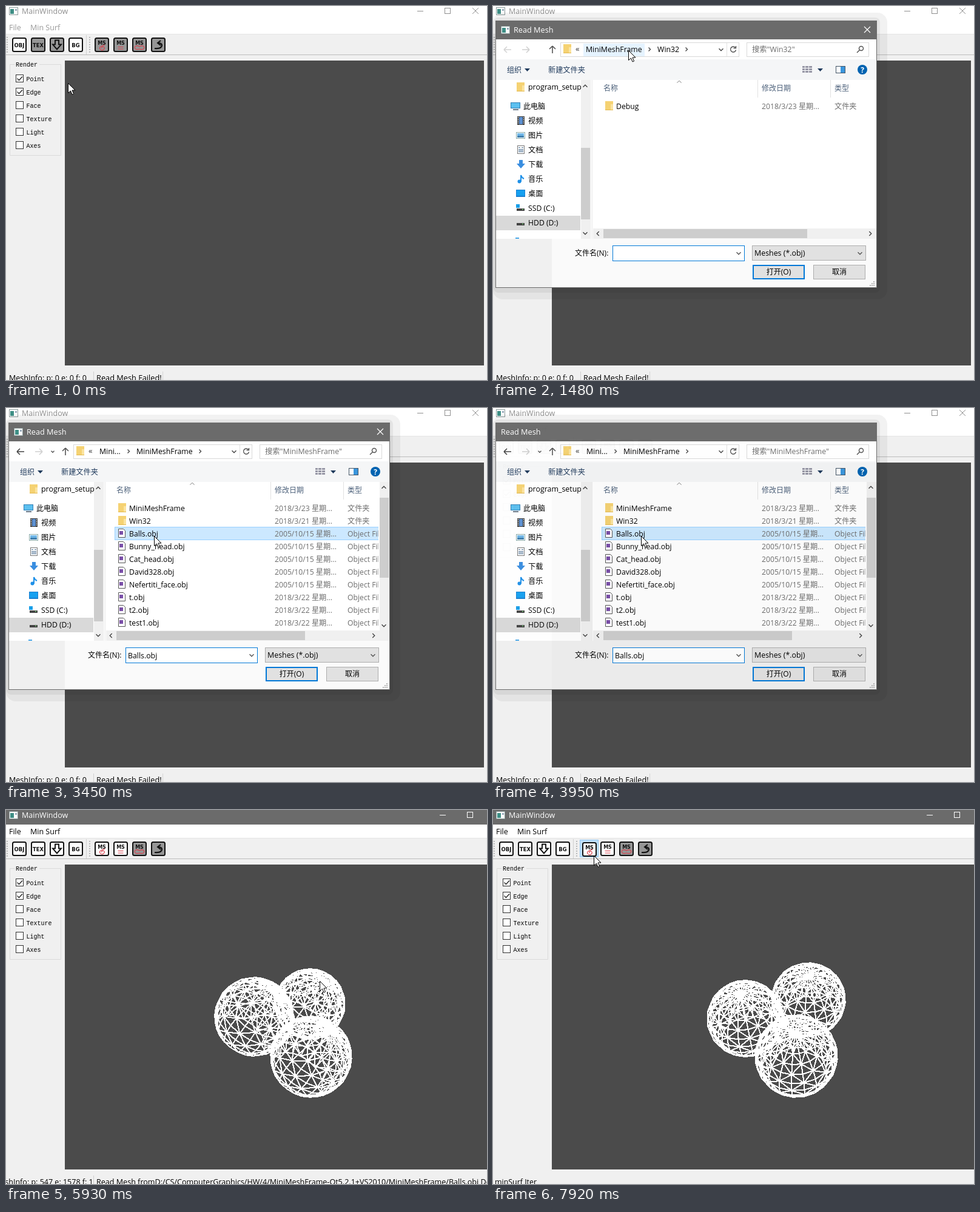
An HTML page that plays this animation: 793x617 px, repeating every 8000 ms.

```html
<!DOCTYPE html>
<html lang="zh">
<head>
<meta charset="utf-8">
<title>Mesh viewer</title>
<style>
html, body { margin: 0; width: 100%; height: 100%; overflow: hidden; background: #f0f0f0; }
svg { display: block; width: 793px; height: 617px; }
text { font-family: "Open Sans", "Noto Sans CJK SC", "Noto Sans CJK", "Noto Sans", sans-serif; white-space: pre; }
.mono { font-family: "Liberation Mono", monospace; }
.bold { font-family: "DejaVu Sans", sans-serif; font-weight: bold; }
</style>
</head>
<body>
<svg id="stage" viewBox="0 0 793 617"></svg>
<script>
const LOOP = 8000;
const BLUE = '#0078d7', GREY = '#6d6d6d';

// ---- drawing helpers ----
const rect = (x, y, w, h, fill, extra = '') =>
  `<rect x="${x}" y="${y}" width="${w}" height="${h}" fill="${fill}" ${extra}/>`;
const frame = (x, y, w, h, stroke, fill = 'none', sw = 1) =>
  rect(x + sw / 2, y + sw / 2, w - sw, h - sw, fill, `stroke="${stroke}" stroke-width="${sw}"`);
const line = (d, stroke, sw = 1, extra = '') =>
  `<path d="${d}" fill="none" stroke="${stroke}" stroke-width="${sw}" ${extra}/>`;
const shape = (d, fill, extra = '') => `<path d="${d}" fill="${fill}" ${extra}/>`;
const text = (x, y, s, fill = '#000', size = 12.3, extra = '') =>
  `<text x="${x}" y="${y}" fill="${fill}" font-size="${size}" ${extra}>${s}</text>`;
const at = (x, y, body) => `<g transform="translate(${x} ${y})">${body}</g>`;
const chevron = (x, y, dir, color = '#444', r = 3.5, sw = 1.4) =>
  line(`M${-r} ${-r / 2}L0 ${r / 2}L${r} ${-r / 2}`, color, sw,
    `transform="translate(${x} ${y}) rotate(${{ down: 0, left: 90, up: 180, right: 270 }[dir]})"`);

const windowIcon = (x, y) => at(x, y,
  frame(0, 0, 15, 13, '#8a9a9a', '#fff') + rect(2, 3, 6, 8, '#3f8f86') + rect(10, 3, 3, 3, '#9ab'));
const folder = (x, y) => at(x, y,
  rect(0, 0, 13, 15, '#f5d273') + rect(9, 5, 4, 10, '#fbe4a0') + rect(0, 14, 13, 1, '#e3b94f'));
const objFile = (x, y) => at(x, y,
  shape('M1.5.5h8l3 3v11h-11z', '#fff', 'stroke="#555"') + rect(3, 4, 6, 6, '#7a4fa8'));
const cursor = ([x, y]) => at(x, y,
  shape('M.5.5v16l4-3.5 2.6 6 2.5-1.1-2.6-5.9h5z', '#fff', 'stroke="#000"'));

// ---- main window ----
const label = (s, y, size) => text(12, y, s, '#111', size, 'class="bold" text-anchor="middle"');
const ms = red => label('MS', 11.5, 8) + line(red, '#d8404c', 1.2);
const glyphs = {
  obj: label('OBJ', 15.5, 8.6),
  tex: label('TEX', 15.5, 8.4),
  save: line('M9 4.5h6v7h4l-7 8-7-8h4z', '#111', 1.9),
  bg: label('BG', 15.5, 8.4),
  ms1: ms('M17 12l-5 2q-5 2-3 5t6 1q3-4-1-5-3 0-2 3'),
  ms2: ms('M7.5 15.5h9M7.500 19h9'),
  ms3: ms('M12 15q-6-3-8 1 0 5 8 3 8 2 8-3-2-4-8-1z'),
  undo: line('M6 18Q17 19 18 13Q18 9 12 9M16 5l-5 4 5 4', '#111', 2.1)
};
const buttons = [['obj', 10], ['tex', 41], ['save', 72], ['bg', 103],
  ['ms1', 146], ['ms2', 177], ['ms3', 208], ['undo', 239]];

function toolbar(loaded, hot, pressed) {
  const grip = x => line(`M${x} 51v28`, '#aaa', 2, 'stroke-dasharray="1.5 2.5"');
  let s = rect(0, 47, 793, 34, '#f0f0f0') + rect(0, 46, 793, 1, '#e4e4e4') + rect(0, 80, 793, 1, '#bcbcbc') +
    grip(2) + grip(138) + rect(132, 48, 1, 32, '#cfcfcf');
  buttons.forEach(([id, x], i) => {
    const on = loaded ? i < 6 : i === 0 || i === 3;
    const d = id === hot && pressed ? 1 : 0;
    if (id === hot) s += frame(x - 3, 49, 31, 29, '#90c8f6', pressed ? '#bfdff8' : '#d5e9f9');
    s += at(x + d, 52 + d,
      rect(1, 1, 22, 22, on ? '#fff' : '#969696', 'rx="2.5" stroke="#111" stroke-width="2"') + glyphs[id]);
  });
  return s;
}

function renderBox() {
  let s = line('M14 96.5H6.5V246.5H90.5V96.5H55', '#dadada') + text(16, 100, 'Render', '#000', 10, 'class="mono"');
  ['Point', 'Edge', 'Face', 'Texture', 'Light', 'Axes'].forEach((name, i) => {
    const y = 113 + 22 * i;
    s += frame(16, y, 13, 13, '#333', '#fff') + text(33.5, y + 11, name, '#000', 10, 'class="mono"');
    if (i < 2) s += line(`M18.5 ${y + 6.5}l3 3 5.5-6`, '#222', 1.3);
  });
  return s;
}

function statusBar(loaded, tip) {
  if (tip) return text(3, 618, tip, '#000', 12.4);
  const info = loaded
    ? `<svg width="143" height="617">${text(-20, 618, 'MeshInfo: p: 547 e: 1578 f: 1032', '#000', 12.5)}</svg>` +
      text(149, 618, 'Read Mesh fromD:/CS/ComputerGraphics/HW/4/MiniMeshFrame-Qt5.2.1+VS2010/MiniMeshFrame/Balls.obj Done', '#000', 12.57)
    : text(5, 618, 'MeshInfo: p: 0 e: 0 f: 0', '#000', 12.5) + text(149, 618, 'Read Mesh Failed!', '#000', 12.75) +
      rect(258, 603, 1, 14, '#d4d4d4');
  return info + rect(144, 603, 1, 14, '#d0d0d0');
}

function mainWindow({ loaded, hot, pressed, tip }) {
  const ink = loaded ? '#fff' : '#8f8f8f', menu = loaded ? '#000' : '#999', mx = loaded ? 715 : 678;
  return rect(0, 0, 793, 617, '#f0f0f0') + rect(0, 0, 793, 47, '#fff') +
    (loaded ? rect(0, 0, 793, 24, '#6b6b6b') : '') +
    windowIcon(5, 2) + text(26, 13, 'MainWindow', ink, 12.5) +
    line(`M${mx} 8.5h10`, ink) + frame(mx + 45, 3, 10, 10, ink) +
    line(`M${mx + 91} 3l10 10m0-10l-10 10`, ink) +
    text(5, 40, 'File', menu, 12.5) + text(40, 40, 'Min Surf', menu, 12.5) +
    toolbar(loaded, hot, pressed) + renderBox() +
    rect(97, 90, loaded ? 696 : 691, 503, '#4b4b4b') + statusBar(loaded, tip);
}

// ---- mesh: three open balls, each [cx, cy, r, pole dx, pole dy] ----
const poses = [
  { spin: 0, balls: [[461, 290, 66, 0, 6], [401, 392, 66, 7, -5], [521, 392, 66, -8, -5]] },
  { spin: 22, balls: [[478, 305, 62, 12, -20], [406, 365, 66, 18, -26], [496, 411, 67, 13, -25]] },
  { spin: 34, balls: [[486, 316, 58, 20, -33], [392, 345, 66, 27, -38], [495, 414, 67, 25, -37]] },
  { spin: 38, balls: [[501, 320, 58, 24, -38], [409, 341, 65, 31, -44], [503, 407, 67, 32, -42]] },
  { spin: 42, balls: [[520, 313, 61, 0, -39], [416, 344, 63, -8, -42], [500, 406, 68, -2, -37]] }
];
const RINGS = 9, SPOKES = 20, RING_STEP = Math.PI / 12;

// See-through wireframe from the pole down to an open rim.
function ball([cx, cy, r, px, py], spin) {
  const a = px / r, b = py / r, c = Math.sqrt(1 - a * a - b * b), k = 1 / (1 + c);
  const vertex = (i, j) => {
    const th = i * RING_STEP, ph = j * 2 * Math.PI / SPOKES + spin;
    const x = Math.sin(th) * Math.cos(ph), y = Math.sin(th) * Math.sin(ph), z = Math.cos(th);
    return (cx + r * ((1 - a * a * k) * x - a * b * k * y + a * z)).toFixed(1) + ' ' +
      (cy + r * (-a * b * k * x + (1 - b * b * k) * y + b * z)).toFixed(1);
  };
  let d = '';
  for (let i = 0; i < RINGS; i++) {
    for (let j = 0; j < SPOKES; j++) {
      const A = vertex(i, j), B = vertex(i, j + 1), C = vertex(i + 1, j + 1), D = vertex(i + 1, j);
      d += `M${A}L${D}L${C}`;
      if (i) d += (i + j) % 2 ? `L${A}` : `M${B}L${D}`;
    }
  }
  return d;
}
const mesh = ({ spin, balls }) =>
  line(balls.map(q => ball(q, spin * Math.PI / 180)).join(''), '#fff', 2.1,
    'shape-rendering="crispEdges" stroke-linejoin="round"');

// ---- file dialog ----
const files = [
  ['ipch', '2018/3/23'], ['MiniMeshFrame', '2018/3/23'], ['Win32', '2018/3/21'],
  ['Balls.obj', '2005/10/15'], ['Bunny_head.obj', '2005/10/15'], ['Cat_head.obj', '2005/10/15'],
  ['David328.obj', '2005/10/15'], ['Nefertiti_face.obj', '2005/10/15'],
  ['t.obj', '2018/3/22'], ['t2.obj', '2018/3/22'], ['test1.obj', '2018/3/22']
];

const drive = rect(1, 9, 13, 4, '#444') + rect(10, 10, 2, 1, '#8f8');
const tree = [
  ['视频', rect(2, 1, 12, 14, '#333') + rect(5, 2, 6, 12, '#5b8fd0') + line('M3.5 2v12m9-12v12', '#fff', 1, 'stroke-dasharray="2 1"')],
  ['图片', frame(0, 3, 15, 11, '#8aa', '#fff') + rect(2, 5, 11, 4, '#6fb6e8') + rect(2, 9, 11, 3, '#3f7fae')],
  ['文档', frame(2, 1, 12, 14, '#777', '#fff') + line('M4 4.5h3m2 0h3M4 7.5h8M4 9.5h8M4 11.5h8', '#579')],
  ['下载', shape('M5 1h6v6h4l-7 8-7-8h4z', '#3a8ee0')],
  ['音乐', line('M8 13V2q1 4 5 6', '#1e90e8', 2) + '<circle cx="5.5" cy="12.5" r="3" fill="#1e90e8"/>'],
  ['桌面', rect(0, 2, 15, 12, '#1a7fd0') + rect(1, 3, 13, 9, '#16a0f0')],
  ['SSD (C:)', rect(0, 2, 6, 6, '#1a9fe8') + drive],
  ['HDD (D:)', drive]
];

function treePane() {
  let s = rect(5, 122, 140, 262, '#fff') + rect(145, 122, 16, 262, '#f0f0f0') + rect(145, 234, 15, 118, '#cdcdcd') +
    chevron(152, 132, 'up') + chevron(152, 375, 'down') + rect(163, 122, 1, 262, '#ececec') +
    rect(5, 346, 139, 24, '#d9d9d9') + folder(39, 126) +
    `<svg width="145" height="617">${text(58, 138, 'program_setup', '#000', 12.4)}</svg>` +
    at(29, 158, rect(0, 1, 16, 10, '#2f7fb5') + rect(1, 2, 14, 8, '#5cc0f0') + rect(4, 12, 9, 2, '#678')) +
    text(50, 170, '此电脑', '#000', 12) + rect(37, 382, 6, 2, '#4aa8e8');
  tree.forEach(([name, icon], i) => {
    const y = 189 + 24 * i;
    s += at(38, y - 8, icon) + text(58, y + 5, name, '#000', 12.2);
  });
  return s;
}

function listPane({ sub, empty, first = 0, picked, hover, selected }) {
  let s = rect(164, 122, 468, 262, '#fff') + text(182, 140, '名称', '#4c607a', 12) +
    text(443, 140, '修改日期', '#4c607a', 12) + text(563, 140, '类型', '#4c607a', 12) +
    rect(436, 122, 1, 29, '#e2e2e2') + rect(556, 122, 1, 29, '#e2e2e2') + chevron(307, 125, 'up', '#777', 3.5, 1);
  const rows = sub ? [['Debug', '2018/3/23']] : empty ? [] : files.slice(first, first + 10);
  let body = '';
  rows.forEach(([name, date], i) => {
    const y = 165 + 21 * i, isObj = name.endsWith('.obj');
    if (name === picked) body += rect(179, y - 11, 436, 22, '#d9d9d9');
    if (name === hover) body += rect(179, y - 11, 436, 22, '#e5f3ff');
    if (name === selected) body += frame(179, y - 11, 440, 22, '#99d1ff', '#cce8ff');
    body += (isObj ? objFile(184, y - 8) : folder(185, y - 8)) + text(203, y + 5, name, '#000', 12.2) +
      text(443, y + 5, date + ' 星期...', GREY, 12.2) + text(563, y + 5, isObj ? 'Object File' : '文件夹', GREY, 12.2);
  });
  s += `<svg width="614" height="617">${body}</svg>` + rect(165, 367, 467, 17, '#f0f0f0');
  const wide = sub || empty;
  s += rect(182, 368, wide ? 336 : 311, 15, '#cdcdcd') + chevron(173, 375.5, 'left') + chevron(wide ? 622 : 606, 375.5, 'right');
  if (!wide) {
    s += rect(616, 122, 16, 245, '#f0f0f0') + rect(616, first ? 148 : 139, 15, 132, '#cdcdcd') +
      chevron(623, 131, 'up') + chevron(623, 359, 'down');
  }
  return s;
}

function navBar({ sub, back, crumb }) {
  const arrow = (x, dir, ink) => line('M-6 0H6M-6 0l5-5M-6 0l5 5', ink, 1.6, `transform="translate(${x} 72) rotate(${dir})"`);
  const hot = crumb ? rect(sub ? 149 : 211, 62, 101, 21, '#e5f3ff') : '';
  const sep = x => chevron(x, 71.5, 'right', '#444', 3);
  const path = sub
    ? text(153, 76, 'MiniMeshFrame') + sep(258) + text(271, 76, 'Win32') + sep(319)
    : text(154, 76, 'Mini...') + sep(202) + text(215, 76, 'MiniMeshFrame') + sep(320);
  return rect(5, 55, 627, 34, '#fff') + arrow(24, 0, back ? '#444' : '#d4d4d4') + arrow(54, 180, '#d0d0d0') +
    (back ? chevron(77, 72, 'down', '#555', 2.5) : '') + arrow(98, 90, '#555') +
    frame(111, 60, 295, 24, '#d9d9d9', '#fff') + rect(385, 61, 1, 22, '#e0e0e0') + hot +
    folder(116, 63) + text(136, 75, '«', '#333', 13) + path + chevron(376, 72, 'down') +
    line('M399.5 68.5a4.5 4.5 0 1 0 1 4M400.5 66v3.5h-4', '#555', 1.4) +
    frame(418, 60, 202, 24, '#d9d9d9', '#fff') + text(427, 76, `搜索"${sub ? 'Win32' : 'MiniMeshFrame'}"`, GREY) +
    line('M600 77l4-4M603.5 70a3.5 3.5 0 1 1 7 0a3.5 3.5 0 1 1-7 0', '#555', 1.5);
}

function commandBar() {
  let s = rect(5, 88, 627, 34, '#f5f6f7') + text(23, 110, '组织', '#1e395b', 12) + shape('M52 103h9l-4.5 5z', '#1e395b') +
    text(91, 110, '新建文件夹', '#1e395b', 12.2);
  for (let i = 0; i < 3; i++) s += line(`M510 ${100.5 + 4 * i}h4m1 0h5m1 0h5`, '#889', 2.4);
  return s + shape('M535 103h9l-4.5 5z', '#1e395b') + frame(565, 99, 16, 12, '#456', '#fff') + rect(573, 100, 7, 10, '#3a96dd') +
    '<circle cx="609" cy="105" r="8" fill="#0063b1"/>' + text(609, 109.5, '?', '#fff', 12, 'text-anchor="middle" font-weight="bold"');
}

function bottomPane({ name, caret }) {
  let grip = '';
  for (let i = 0; i < 3; i++) for (let j = 2 - i; j < 3; j++) grip += rect(621 + 3 * j, 454 + 3 * i, 2, 2, '#b5b5b5');
  return text(135, 412, '文件名(N):', '#000', 12) + frame(197, 395, 218, 26, BLUE, '#fff') +
    (name ? text(201, 413, name) : '') + (caret ? rect(201, 400, 1, 17, '#000') : '') + chevron(405, 408, 'down', '#555') +
    frame(427, 395, 188, 25, '#adadad', '#e1e1e1') + text(431, 412, 'Meshes (*.obj)', '#000', 12.4) + chevron(605, 408, 'down', '#555') +
    frame(428, 427, 86, 24, BLUE, '#e1e1e1', 2) + text(471, 443, '打开(O)', '#000', 12, 'text-anchor="middle"') +
    frame(528, 427, 86, 24, '#adadad', '#e1e1e1') + text(571, 443, '取消', '#000', 12, 'text-anchor="middle"') + grip;
}

function dialog(o) {
  const faded = o.opening || o.closing;
  const alpha = o.opening ? 0.96 : o.closing ? 0.975 : 1;
  const fit = o.opening ? 'transform="translate(318 244) scale(.996) translate(-318 -244)"' : '';
  return rect(0, 11, 650, 473, '#000', 'rx="16" opacity=".05"') + rect(1, 19, 637, 454, '#000', 'rx="8" opacity=".06"') +
    `<g opacity="${alpha}" ${fit}>` +
    rect(4, 24, 629, 441, faded ? '#f0f0f0' : '#fafafa') + rect(5, 384, 92, 80, '#f0f0f0') +
    navBar(o) + commandBar() + treePane() + listPane(o) + bottomPane(o) +
    rect(4, 24, 629, 31, '#6b6b6b') + frame(4, 24, 629, 441, '#6b6b6b') +
    (o.closing ? '' : windowIcon(13, 33) + line('M612 34l10 10m0-10l-10 10', '#fff', 1.2)) +
    text(o.closing ? 13 : 34, 44, 'Read Mesh', '#fff', 12.7) + '</g>';
}

const busy = ([x, y]) =>
  `<circle cx="${x + 13}" cy="${y}" r="5.5" fill="#8cc6f5" stroke="#1e86dc" stroke-width="4"/>`;

// ---- timeline: each step holds until the next ----
const steps = [
  { t: 0, cur: [102, 127] },
  { t: 500, cur: [22, 64], hot: 'obj', tip: 'Read Mesh' },
  { t: 980, cur: [197, 215], dlg: { sub: 1, opening: 1, caret: 1 } },
  { t: 1480, cur: [223, 73], dlg: { sub: 1, crumb: 1 } },
  { t: 1970, cur: [223, 73], dlg: { empty: 1, crumb: 1, caret: 1 } },
  { t: 2470, cur: [260, 272], busy: 1, dlg: { back: 1, picked: 'Win32', hover: 'Cat_head.obj' } },
  { t: 2960, cur: [244, 222], dlg: { back: 1, picked: 'Win32', hover: 'Balls.obj', caret: 1 } },
  { t: 3450, cur: [244, 211], dlg: { back: 1, first: 1, selected: 'Balls.obj', name: 'Balls.obj' } },
  { t: 3950, cur: [244, 211], dlg: { back: 1, first: 1, selected: 'Balls.obj', name: 'Balls.obj', closing: 1 } },
  { t: 4450, cur: [515, 340], pose: 0 },
  { t: 4940, cur: [512, 306], pose: 1 },
  { t: 5440, cur: [512, 288], pose: 2 },
  { t: 5930, cur: [517, 282], pose: 3 },
  { t: 6420, cur: [480, 284], pose: 4 },
  { t: 6910, cur: [186, 87], pose: 4 },
  { t: 7410, cur: [166, 75], pose: 4, hot: 'ms1', tip: 'minSurf Iter' },
  { t: 7920, cur: [166, 75], pose: 4, hot: 'ms1', pressed: 1, tip: 'minSurf Iter' }
];

const scenes = steps.map(s => {
  const loaded = s.pose !== undefined;
  return mainWindow({ ...s, loaded }) + (loaded ? mesh(poses[s.pose]) : '') +
    (s.dlg ? dialog(s.dlg) : '') + (s.busy ? busy(s.cur) : '') + cursor(s.cur);
});

const stage = document.getElementById('stage');
const start = performance.now();
let shown = -1;
function tick() {
  const t = (performance.now() - start) % LOOP;
  let i = steps.length - 1;
  while (steps[i].t > t) i--;
  if (i !== shown) stage.innerHTML = scenes[shown = i];
  requestAnimationFrame(tick);
}
tick();
</script>
</body>
</html>
```
